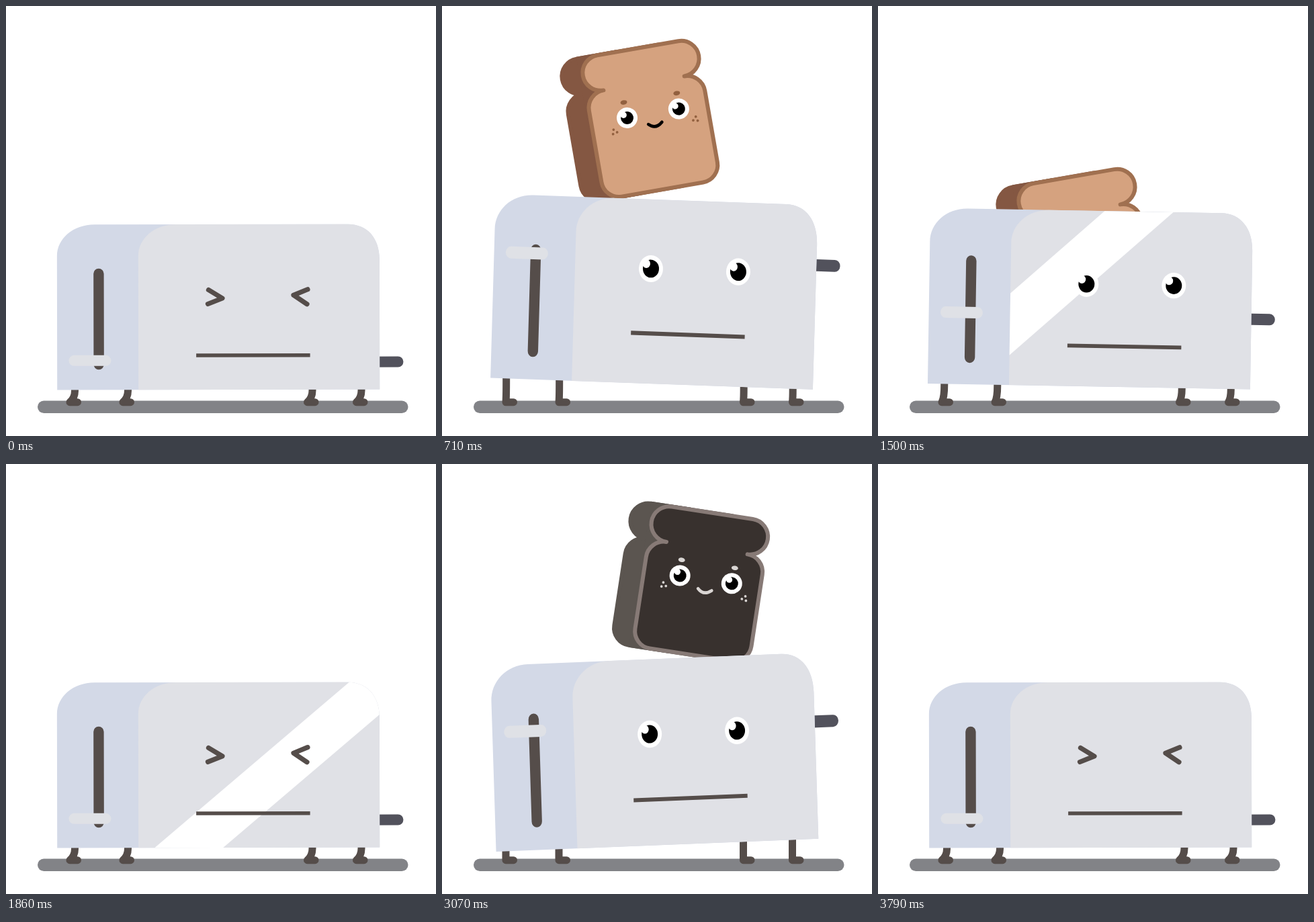
An HTML page with a canvas for the animation above (3.87 s loop, 640 by 640 pixels).

```html
<!DOCTYPE html>
<html lang="en">
<head>
<meta charset="utf-8">
<title>Toaster</title>
<style>
  html, body { margin: 0; width: 100%; height: 100%; overflow: hidden; background: #fff; }
  canvas { display: block; width: 640px; height: 640px; }
</style>
</head>
<body>
<canvas id="stage" width="640" height="640"></canvas>
<script>
const ctx = document.getElementById('stage').getContext('2d');
const LOOP = 3870, FPS = 14, LAST = 53, HOP = 27;
const MID_X = 316, BASE_Y = 570.5, HEIGHT = 246;
const DARK = '#554d4a';

const brown = { x: 310, y: 165, apex: 11.9, angle: -9.9, faceFall: 13, face: '#d5a27f',
  crust: '#a07050', side: '#845742', marks: '#92603f', mouth: '#000' };
const burnt = { x: 386, y: 168.5, apex: 40, angle: 8.7, faceFall: 8, face: '#38312e',
  crust: '#877a76', side: '#5b5550', marks: '#d9d5d3', mouth: '#d9d5d3' };

function ease(t, from, to) {
  const s = Math.min(1, Math.max(0, (t - from) / (to - from)));
  return s * s * (3 - 2 * s);
}

// Rises from a to b, holds, falls from c to d.
const pulse = (t, a, b, c, d) => ease(t, a, b) - ease(t, c, d);

function ellipse(x, y, rx, ry, color) {
  ctx.fillStyle = color;
  ctx.beginPath();
  ctx.ellipse(x, y, rx, ry, 0, 0, Math.PI * 2);
  ctx.fill();
}

const dot = (x, y, r, color) => ellipse(x, y, r, r, color);

function pill(x, y, w, h, color) {
  ctx.fillStyle = color;
  ctx.beginPath();
  ctx.roundRect(x, y, w, h, Math.min(w, h) / 2);
  ctx.fill();
}

function stroke(path, width, color, cap = 'round') {
  ctx.strokeStyle = color;
  ctx.lineWidth = width;
  ctx.lineCap = cap;
  ctx.lineJoin = 'round';
  ctx.stroke(path);
}

function fill(path, color) {
  ctx.fillStyle = color;
  ctx.fill(path);
}

function shell(left) {
  return new Path2D(`M${left} 571V372C${left} 346 ${left + 24} 325 ${left + 56} 325
    H509C538 325 556 346 556 377V571Z`);
}

function breadShape() {
  const p = new Path2D(), q = Math.PI / 2, r = 26.5;
  p.arc(-61, -81.5, r, q, 3 * q);
  p.arc(61, -81.5, r, -q, q);
  p.arc(61, -28.5, r, -q, 0);
  p.arc(61.5, 79.5, r - 0.5, 0, q);
  p.arc(-61.5, 79.5, r - 0.5, q, 2 * q);
  p.arc(-61, -28.5, r, 2 * q, 3 * q);
  p.closePath();
  return p;
}

const body = shell(76), front = shell(197), bread = breadShape();
const smile = new Path2D('M-9.5 6.5Q0 16 11 6.5');
const squints = [new Path2D('M-8.5 -11L12 1.5L-9.5 10'), new Path2D('M9 -11.5L-12 -3L8 10.5')];

function drawBread(color, crust) {
  fill(bread, color);
  stroke(bread, 6, crust);
}

function drawToast(t, f) {
  const d = Math.abs(f - t.apex);
  const drop = f < t.apex ? d ** 2.2 + 66 * (d / 12) ** 8 : 0.64 * d ** 2.59;
  if (drop > 282) return;
  ctx.save();
  ctx.translate(t.x, t.y + drop);
  ctx.rotate(t.angle * Math.PI / 180);

  ctx.save();
  ctx.translate(-31.5, 0);
  drawBread(t.side, t.side);
  ctx.fillRect(-61, -111, 60, 219.5);
  ctx.restore();
  drawBread(t.face, t.crust);

  ctx.translate(5.5, 0);
  for (const side of [-1, 1]) {
    ellipse(side * 40, -32, 5, 3.3, t.marks);
    dot(side * 39, -8.5, 15.5, '#fff');
    dot(side * 39, -8.5, 9.5, '#000');
    dot(side * 39 - 4.5, -13.5, 4.6, '#fff');
    for (let i = 0; i < 3; i++) {
      const turn = side * 0.25 - Math.PI / 2 + i * Math.PI * 2 / 3;
      dot(side * 61 + 3.8 * Math.cos(turn), 10 + side + 3.8 * Math.sin(turn), 1.9, t.marks);
    }
  }
  stroke(smile, 4.6, t.mouth);
  ctx.restore();
}

function drawLegs(pose) {
  const bend = 7.5 * (1 - pose.stretch);
  for (const x of [95, 174, 448.5, 521.5]) {
    const hip = pose.y + (x - MID_X) * Math.tan(pose.angle) * pose.scale - 5;
    const leg = new Path2D();
    leg.moveTo(x + bend, hip);
    leg.lineTo(x + bend, Math.min(hip + 7, 574));
    leg.quadraticCurveTo(x + bend, 583, x, 589.7);
    leg.lineTo(x + 11.5, 589.7);
    stroke(leg, 11, DARK);
  }
}

function drawShine(f) {
  const d = f - 26, x = 221 + 34.5 * d - 0.12 * d * d;
  ctx.save();
  ctx.clip(front);
  fill(new Path2D(`M${x} 571l290 -246h102l-290 246z`), '#fff');
  ctx.restore();
}

function drawFace(pose) {
  const y = 433.5 - pose.faceLift;
  [310, 440].forEach((x, i) => {
    ctx.save();
    ctx.translate(x, y);
    if (pose.stretch < 0.16) {
      stroke(squints[i], 7.2, DARK);
    } else {
      dot(0, 0, 18, '#fff');
      dot(0, 0, 12, '#000');
      dot(-7, -6.5, 5.8, '#fff');
    }
    ctx.restore();
  });
  stroke(new Path2D(`M283 ${y + 86.5}h169.5`), 5.4, DARK, 'butt');
}

function poseAt(f) {
  const second = f >= HOP;
  const t = second ? f - HOP : f;
  const lean = pulse(t, 0, 6, 17, 25.5);
  const tilt = second ? -lean : lean;
  const stretch = pulse(t, 0, 12.3, 16, 26);
  return {
    stretch,
    scale: 1 + 31 * stretch / HEIGHT,
    angle: (1.95 * tilt - 0.1) * Math.PI / 180,
    y: BASE_Y - 6.2 * lean - 2.6 * tilt,
    lever: 527.5 - 114 * pulse(t, 0, 7, 17, 25) - 11 * pulse(t, 6, 10, 10, 15),
    faceLift: 16 * pulse(t, 0, 7, (second ? burnt : brown).faceFall, 26.5)
  };
}

function drawToaster(pose, f) {
  const half = HEIGHT / 2;
  ctx.save();
  ctx.translate(MID_X, pose.y);
  ctx.scale(1, pose.scale);
  ctx.translate(0, -half);
  ctx.rotate(pose.angle);
  ctx.translate(-MID_X, half - BASE_Y);

  pill(521, pose.lever - 5.5, 70.3, 16, '#52525c');
  fill(body, '#d3d9e7');
  fill(front, '#e0e1e6');
  drawShine(f);
  pill(130.3, 390.5, 15.4, 150.5, DARK);
  pill(93.3, pose.lever - 8, 63, 16, '#dfe1e6');
  drawFace(pose);
  ctx.restore();
}

function draw(f) {
  const pose = poseAt(f);
  ctx.fillStyle = '#fff';
  ctx.fillRect(0, 0, 640, 640);
  drawToast(brown, f);
  drawToast(burnt, f);
  pill(47, 587.5, 551.5, 18.5, '#828387');
  drawLegs(pose);
  drawToaster(pose, f);
}

function tick() {
  const t = performance.now() % LOOP;
  draw(Math.min(LAST, Math.floor((t + 5) * FPS / 1000)));
  requestAnimationFrame(tick);
}
tick();
</script>
</body>
</html>
```
